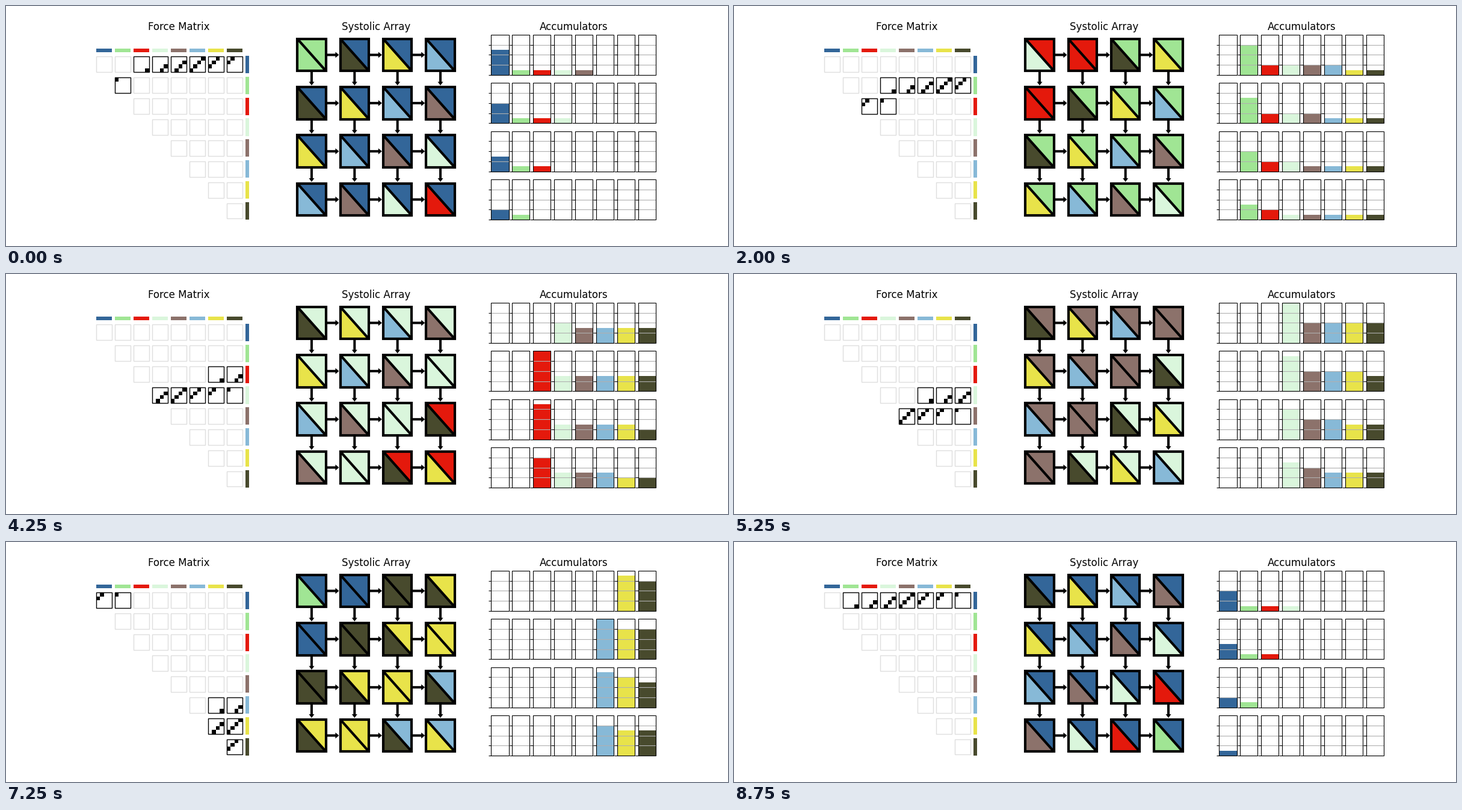
Recreate the animation shown at these times as a matplotlib script. Size 1200 px wide and 400 px high, loop 9000 ms.

```python
import matplotlib.pyplot as plt
from matplotlib.animation import FuncAnimation
from matplotlib.patches import Polygon, Rectangle

COLORS = ["#336699", "#a0e594", "#e4190c", "#daf6dc",
          "#8c726b", "#87b9d7", "#e8e34a", "#484a2d"]
N, P = 8, 4                      # blocks per side, array size
TILES = [(i, j) for i in range(N) for j in range(i, N)]
STEPS = len(TILES)
LEFT, TOP, HEIGHT = 150, 48, 308
WIDTH = 930 / 3.4
IDLE = "#dedede"

fig = plt.figure(figsize=(12, 4), dpi=100, facecolor="white")
ax = fig.add_axes([0, 0, 1, 1])
ax.set(xlim=(0, 1200), ylim=(400, 0))
ax.axis("off")


def panel(index, title):
    x = LEFT + index * 1.2 * WIDTH
    ax.text(x + WIDTH / 2, TOP - 8.33, title, size=12, ha="center",
            va="baseline", family="DejaVu Sans")
    return x


def slot(x, rows, cols, r, c):
    """Pixel box of one cell in a grid with gaps of a fifth of a cell."""
    w = WIDTH / (1.2 * cols - 0.2)
    h = HEIGHT / (1.2 * rows - 0.2)
    return x + 1.2 * w * c, TOP + 1.2 * h * r, w, h


def rect(x, y, w, h, **style):
    return ax.add_patch(Rectangle((x, y), w, h, **style))


def poly(points, **style):
    return ax.add_patch(Polygon(points, closed=True, **style))


def line(xs, ys, **style):
    ax.plot(xs, ys, solid_capstyle="butt", **style)


def make_matrix():
    x0 = panel(0, "Force Matrix")
    for k, color in enumerate(COLORS):
        x, y, w, h = slot(x0, N + 1, N + 1, 0, k)
        rect(x, y + h - 5.9, w, 5.9, fc=color, lw=0)
        x, y, w, h = slot(x0, N + 1, N + 1, k + 1, N)
        rect(x, y, 6.3, h, fc=color, lw=0)
    boxes = []
    for i, j in TILES:
        x, y, w, h = slot(x0, N + 1, N + 1, i + 1, j)
        boxes.append(rect(x, y + (h - w) / 2, w, w, fill=False,
                          ec=IDLE, lw=1, zorder=3))
    side = boxes[0].get_width() / P
    dots = [rect(0, 0, side, side, fc="black", lw=0, zorder=2)
            for _ in range(P * P)]
    return boxes, dots


def make_array():
    x0 = panel(1, "Systolic Array")
    units = []
    for r in range(P):
        for c in range(P):
            x, y, w, h = slot(x0, P, P, r, c)
            cx, cy = x + w / 2, y + h / 2
            l, t, b, e = x + 0.1 * w, y + 0.1 * h, y + 0.9 * h, x + 0.9 * w
            lower = poly([(l, t), (l, b), (e, b)], lw=0)
            upper = poly([(l, t), (e, t), (e, b)], lw=0)
            line([l, e], [t, b], color="black", lw=3, zorder=2)
            rect(l, t, e - l, b - t, fill=False, ec="black", lw=3, zorder=3)
            if c < P - 1:
                tip = x + 1.265 * w
                poly([(e, cy - 2), (tip - 6, cy - 2), (tip - 6, cy - 5),
                      (tip, cy), (tip - 6, cy + 5), (tip - 6, cy + 2),
                      (e, cy + 2)], fc="black", lw=0)
            if r < P - 1:
                tip = y + 1.26 * h
                poly([(cx - 2, b), (cx - 2, tip - 6), (cx - 4.5, tip - 6),
                      (cx, tip), (cx + 4.5, tip - 6), (cx + 2, tip - 6),
                      (cx + 2, b)], fc="black", lw=0)
            units.append((r, c, lower, upper))
    return units


def make_bars():
    x0 = panel(2, "Accumulators")
    bars = []
    for r in range(P):
        row = []
        for c, color in enumerate(COLORS):
            x, y, w, h = slot(x0, P, N, r, c)
            row.append(rect(x, y + h, w, 0, fc=color, lw=0))
            for q in range(4):
                ty = y + h - q * h / 4
                line([x, x + w], [ty, ty], color="#b0b0b0", lw=0.8, zorder=2)
                line([x - 4.86, x], [ty, ty], color="black", lw=0.8, zorder=2)
            rect(x, y, w, h, fill=False, ec="black", lw=0.8, zorder=3)
        bars.append((row, y + h, h / N))
    return bars


boxes, dots = make_matrix()
units = make_array()
bars = make_bars()


def totals(last):
    """Block counts once tile `last` is in; finished rows are flushed."""
    counts = [0] * N
    for i, j in TILES[:last + 1]:
        counts[i] += 1
        if j != i:
            counts[j] += 1
    row = TILES[last][0]
    return [0] * row + counts[row:]


def update(step):
    head = step + N
    for box in boxes:
        box.set_edgecolor(IDLE)
    for dot, (r, c, lower, upper) in zip(dots, units):
        n = (head - r - c) % STEPS
        i, j = TILES[n]
        lower.set_facecolor(COLORS[j])
        upper.set_facecolor(COLORS[i])
        box = boxes[n]
        box.set_edgecolor("black")
        side = dot.get_width()
        dot.set_xy((box.get_x() + c * side, box.get_y() + r * side))
    for r, (row, base, unit) in enumerate(bars):
        for bar, count in zip(row, totals((head - P - r) % STEPS)):
            bar.set_y(base - count * unit)
            bar.set_height(count * unit)


anim = FuncAnimation(fig, update, frames=STEPS, interval=250,
                     repeat=True, repeat_delay=0, blit=False)
plt.show()
```
